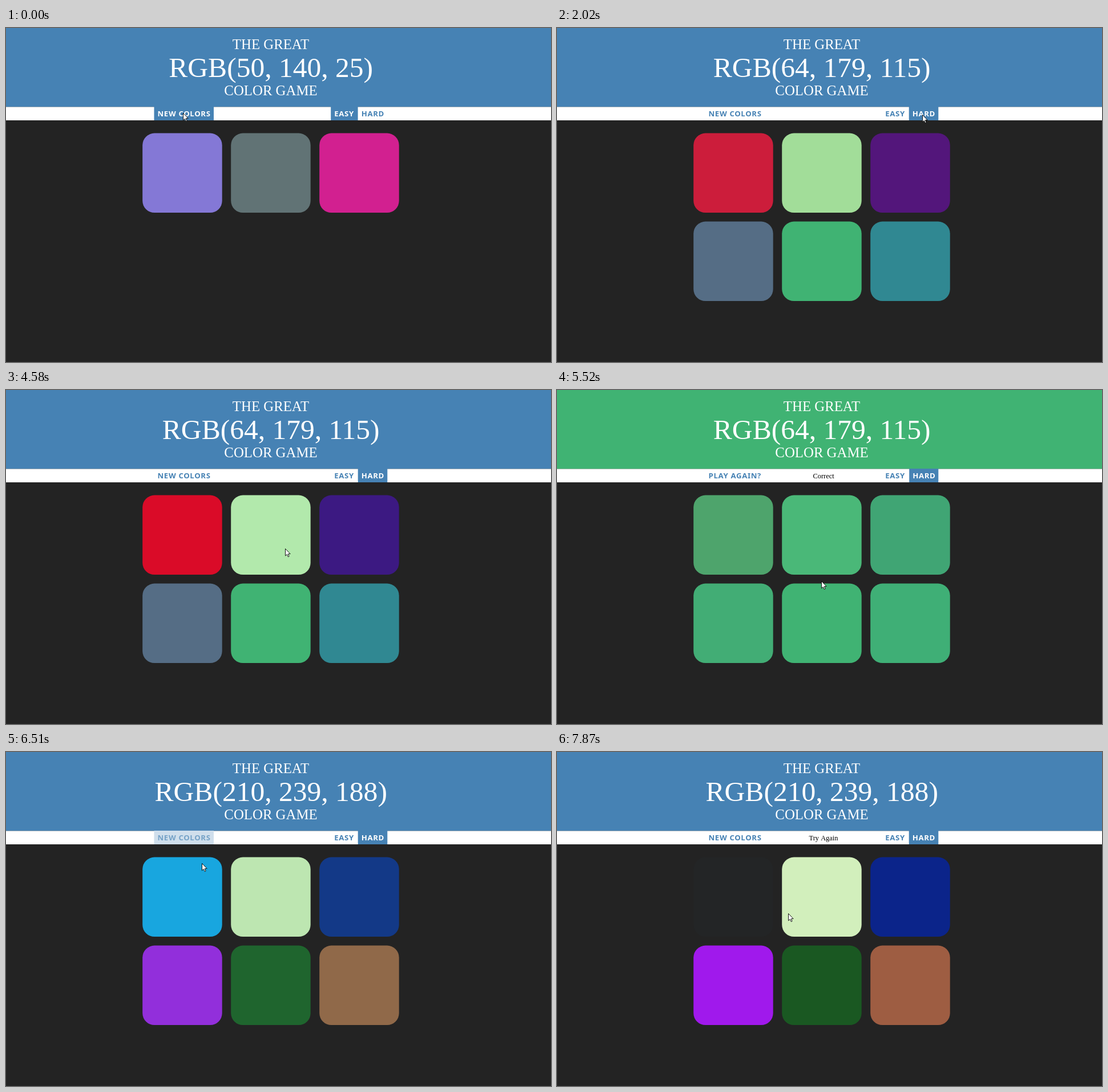
An HTML page with a canvas for the animation above (8000 ms loop, 955 by 586 pixels).

```html
<!DOCTYPE html>
<html lang="en">
<head>
<meta charset="utf-8">
<title>Color Game</title>
<style>
html, body { margin: 0; width: 955px; height: 586px; overflow: hidden; background: #232323; }
canvas { display: block; }
</style>
</head>
<body>
<canvas id="stage" width="955" height="586"></canvas>
<script>
const ctx = document.getElementById('stage').getContext('2d');
const LOOP = 8000;
const SERIF = '"Liberation Serif", serif';
const BLUE = [70, 130, 180], WHITE = [255, 255, 255], GREEN = [64, 179, 115], DARK = [35, 35, 35];

// Moments of the game, in ms
const NEW_GAME = -120, HARD_GAME = 1640, WIN = 5136, AGAIN = 6174, MISS = 7370;

// The screen refreshes only at these moments
const TICKS = [0, 120, 270, 420, 570, 720, 870, 990, 1140, 1290, 1570, 1720, 1840, 1990, 2110, 2260,
  2380, 2530, 2680, 3770, 3890, 4040, 4160, 4310, 4430, 4580, 4700, 4820, 4970, 5250, 5370, 5520,
  5670, 5790, 5910, 6030, 6150, 6270, 6390, 6510, 6660, 6780, 6930, 7050, 7480, 7600, 7750, 7870];

// Pointer path: time, x, y
const PATH = [
  [0, 310, 149], [420, 312, 149], [570, 332, 150], [720, 400, 152], [990, 575, 153],
  [1140, 628, 152], [1290, 640, 152], [2260, 640, 152], [2380, 625, 150], [2530, 603, 148],
  [2680, 600, 147], [3770, 600, 149], [3890, 597, 158], [4040, 585, 178], [4310, 535, 235],
  [4430, 508, 260], [4580, 489, 278], [4700, 489, 318], [4820, 486, 346], [4970, 483, 359],
  [5250, 483, 359], [5370, 479, 355], [5520, 463, 335], [5790, 390, 225], [5910, 362, 178],
  [6030, 350, 156], [6150, 346, 152], [6270, 346, 153], [6390, 346, 166], [6510, 343, 195],
  [6660, 338, 232], [6780, 335, 250], [7050, 332, 265], [7480, 332, 265], [7600, 345, 268],
  [7750, 380, 277], [7870, 405, 283]
];

// Each square: first colour, then [time, next colour]
const SQUARES = [
  [[142, 107, 223], [NEW_GAME, [109, 150, 193]], [HARD_GAME, [218, 11, 40]], [WIN, GREEN],
    [AGAIN, [17, 164, 241]], [MISS, DARK]],
  [[116, 105, 156], [NEW_GAME, [50, 140, 25]], [HARD_GAME, [178, 233, 172]], [WIN, GREEN],
    [AGAIN, [210, 239, 188]]],
  [[197, 45, 174], [NEW_GAME, [240, 0, 72]], [HARD_GAME, [60, 25, 130]], [WIN, GREEN],
    [AGAIN, [11, 36, 138]]],
  [[85, 109, 133], [WIN, GREEN], [AGAIN, [160, 25, 236]]],
  [GREEN, [AGAIN, [26, 88, 34]]],
  [[48, 136, 146], [WIN, GREEN], [AGAIN, [158, 93, 66]]]
];

// CSS "ease": cubic-bezier(.25, .1, .25, 1)
function ease(x) {
  if (x <= 0) return 0;
  if (x >= 1) return 1;
  const bez = (u, a, b) => 3 * a * u * (1 - u) ** 2 + 3 * b * u * u * (1 - u) + u ** 3;
  let lo = 0, hi = 1;
  for (let i = 0; i < 20; i++) {
    const mid = (lo + hi) / 2;
    if (bez(mid, 0.25, 0.25) < x) lo = mid; else hi = mid;
  }
  return bez(lo, 0.1, 1);
}

const mix = (a, b, p) => a.map((v, i) => v + (b[i] - v) * p);
const css = c => `rgb(${c.map(Math.round).join(',')})`;

function rect(x, y, x2, y2, color) {
  ctx.fillStyle = css(color);
  ctx.fillRect(x, y, x2 - x, y2 - y);
}

function text(str, x, y, font, color, align = 'center', spacing = 0) {
  ctx.font = font;
  ctx.textAlign = align;
  ctx.letterSpacing = spacing + 'px';
  ctx.fillStyle = css(color);
  ctx.fillText(str, x, y);
}

function header(t) {
  const goal = t < HARD_GAME ? '50, 140, 25' : t < AGAIN ? '64, 179, 115' : '210, 239, 188';
  rect(0, 0, 955, 138.5, isWon(t) ? GREEN : BLUE);
  text('THE GREAT', 464, 37, '24.8px ' + SERIF, WHITE);
  text(`RGB(${goal})`, 464.2, 86, '49.55px ' + SERIF, WHITE);
  text('COLOR GAME', 464, 118, '24.8px ' + SERIF, WHITE);
}

const isWon = t => t >= WIN && t < AGAIN;

// Highlight level of a button that toggles at the given times
function level(t, start, toggles) {
  let v = start, dir = start ? -1 : 1;
  for (const at of toggles) {
    v += dir * ease((t - at) / 300);
    dir = -dir;
  }
  return v;
}

function button(label, x, x2, lit) {
  if (lit > 0) rect(x, 138, x2, 162, mix(WHITE, BLUE, lit));
  text(label, x + 6, 155, 'bold 13.2px "Noto Sans", sans-serif', mix(BLUE, WHITE, lit), 'left', 0.65);
}

function bar(t) {
  rect(0, 138.5, 955, 162, WHITE);
  const won = isWon(t);
  button(won ? 'PLAY AGAIN?' : 'NEW COLORS', 259.5, 364, level(t, 1, [645, 6000, 6375]));
  button('EASY', 569.2, 616.6, level(t, 1, [HARD_GAME, 2440, 3920]));
  button('HARD', won ? 617.2 : 616.7, 668.3, level(t, 0, [1100]));
  const note = won ? 'Correct' : t >= MISS ? 'Try Again' : '';
  text(note, 467, 155, '12.4px ' + SERIF, [0, 0, 0]);
}

function squares(t) {
  const count = t < HARD_GAME ? 3 : 6;
  SQUARES.slice(0, count).forEach(([first, ...steps], i) => {
    const color = steps.reduce((c, [at, next]) => mix(c, next, ease((t - at) / 600)), first);
    ctx.fillStyle = css(color);
    ctx.beginPath();
    ctx.roundRect(239.2 + (i % 3) * 155, 184.6 + Math.floor(i / 3) * 155, 139.5, 139.5, 21);
    ctx.fill();
  });
}

function pointer(t) {
  let i = PATH.findIndex(p => p[0] > t);
  if (i < 0) i = PATH.length;
  const a = PATH[i - 1], b = PATH[i] || a;
  const p = b === a ? 0 : (t - a[0]) / (b[0] - a[0]);
  const [, x, y] = mix(a, b, p).map(Math.round);
  ctx.save();
  ctx.translate(x + 0.5, y + 0.5);
  ctx.beginPath();
  for (const [px, py] of [[0, 0], [0, 12.4], [2.8, 9.9], [4.8, 14.2], [6.6, 13.4], [4.8, 9.2], [8.6, 9]])
    ctx.lineTo(px, py);
  ctx.closePath();
  ctx.fillStyle = '#fff';
  ctx.strokeStyle = '#000';
  ctx.lineWidth = 0.9;
  ctx.fill();
  ctx.stroke();
  ctx.restore();
}

function draw(now) {
  const time = now % LOOP;
  const t = TICKS.reduce((last, tick) => tick <= time ? tick : last, 0);
  rect(0, 0, 955, 586, DARK);
  header(t);
  bar(t);
  squares(t);
  pointer(t);
}

let begin;
function loop(now) {
  begin ??= now;
  draw(now - begin);
  requestAnimationFrame(loop);
}
draw(0);
requestAnimationFrame(loop);
</script>
</body>
</html>
```
